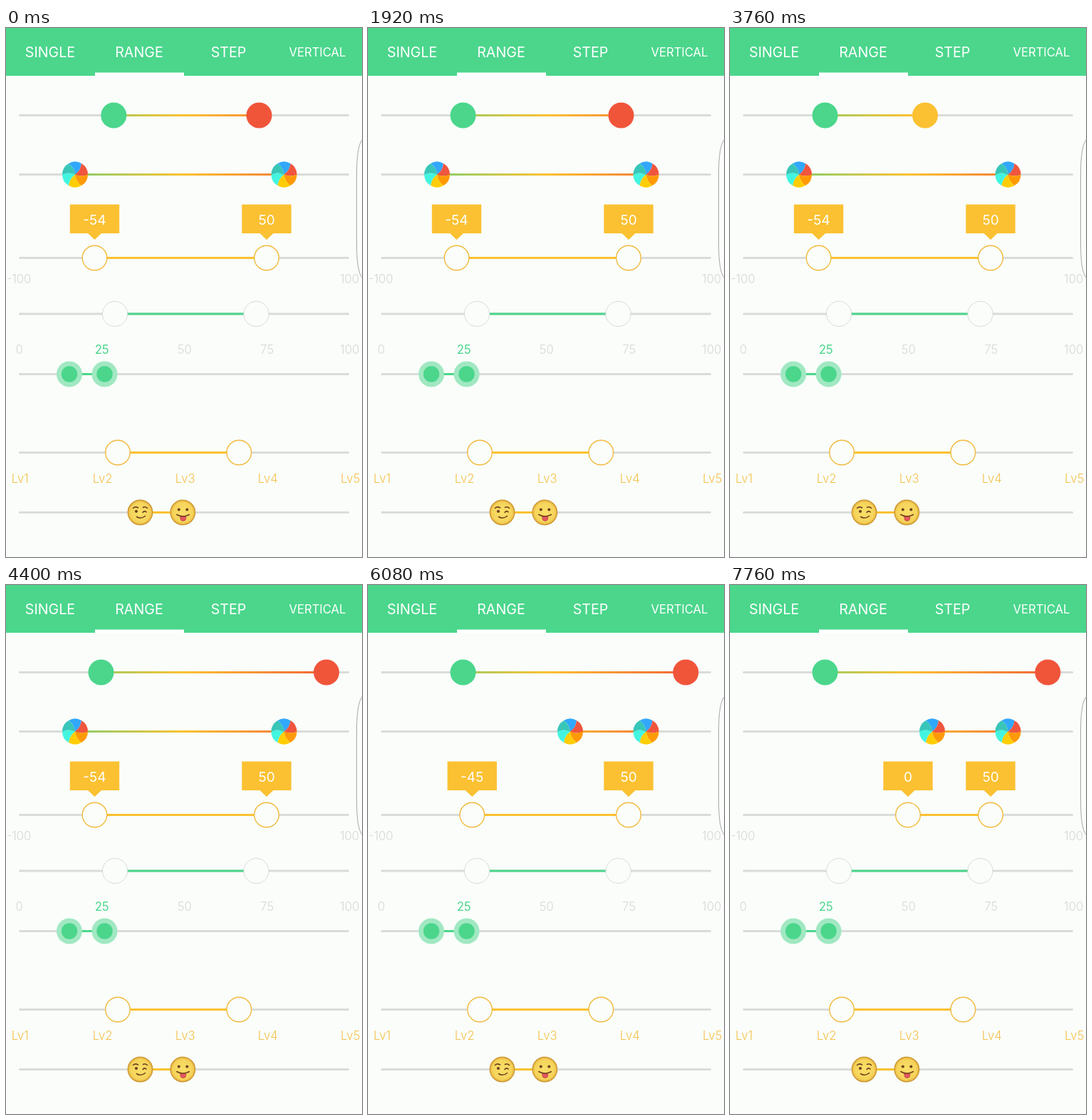
An HTML page that plays this animation: 500x742 px, repeating every 8 s.

```html
<!DOCTYPE html>
<html lang="en">
<head>
<meta charset="utf-8">
<title>Range sliders</title>
<style>
  html, body { margin: 0; width: 100%; height: 100%; overflow: hidden; background: #fafdfa; }
  svg { display: block; width: 100vw; height: 100vh; }
  text { font-family: Inter, Roboto, sans-serif; font-weight: 300; text-anchor: middle; }
  .tab { font-weight: 400; fill: #fff; font-size: 19.7px; }
  .mark { font-size: 16.7px; fill: #d5d8d5; }
  .tip { font-size: 19px; fill: #fff; font-weight: 400; }
</style>
</head>
<body>
<svg id="stage" viewBox="0 0 500 742">
  <defs>
    <linearGradient id="heat" gradientUnits="userSpaceOnUse" x1="18" y1="0" x2="482" y2="0">
      <stop stop-color="#4bd68c"/>
      <stop offset=".5" stop-color="#fbc132"/>
      <stop offset="1" stop-color="#f0553a"/>
    </linearGradient>
    <radialGradient id="skin">
      <stop stop-color="#f8df68"/>
      <stop offset=".8" stop-color="#f5d45b"/>
      <stop offset="1" stop-color="#e5ad3b"/>
    </radialGradient>
  </defs>
  <rect width="500" height="742" fill="#fafdfa"/>
  <rect width="500" height="67" fill="#4bd68c"/>
  <rect x="125" y="62.5" width="125" height="4.5" fill="#fff"/>
  <path d="M500 157Q492.5 167 492.5 205V302Q492.5 341 500 350" fill="none" stroke="#a6a8a6"/>
</svg>
<script>
const GREEN = '#4bd68c', YELLOW = '#fbc132', RED = '#f0553a', GREY = '#dadcda', PAPER = '#fafdfa';
const LOOP = 8000, STEP = 80, LEFT = 18, SPAN = 464;
const stage = document.getElementById('stage');

function add(parent, tag, attrs, text) {
  const node = document.createElementNS('http://www.w3.org/2000/svg', tag);
  for (const key in attrs) node.setAttribute(key, attrs[key]);
  if (text !== undefined) node.textContent = text;
  parent.append(node);
  return node;
}
const circle = (parent, r, attrs) => add(parent, 'circle', { r, ...attrs });
const path = (parent, d, attrs) => add(parent, 'path', { d, ...attrs });
const label = (x, y, text, cls, attrs) => add(stage, 'text', { x, y, class: cls, ...attrs }, text);

// Thumb drawings, centred on the origin
const disc = g => circle(g, 18, { fill: GREEN });
const ring = color => g => circle(g, 17.3, { fill: PAPER, stroke: color, 'stroke-width': 1.4 });
const ghost = g => circle(g, 17.6, { fill: PAPER, stroke: '#d4d7d4', 'stroke-width': .9 });

function halo(g) {
  circle(g, 18, { fill: '#a1e8c2' });
  circle(g, 11.2, { fill: GREEN });
}

function ball(g) {
  const point = (r, deg) => {
    const a = deg * Math.PI / 180;
    return `${(r * Math.cos(a)).toFixed(2)} ${(r * Math.sin(a)).toFixed(2)}`;
  };
  ['#32a8fc', '#f0553e', '#ff9a05', '#ffcd05', '#43f5e0', '#38c6b9'].forEach((fill, i) => {
    const a = -120 + i * 60, b = a + 60;
    path(g, `M0 0Q${point(10, a + 24)} ${point(18, a)}A18 18 0 0 1 ${point(18, b)}Q${point(10, b + 24)} 0 0`, { fill });
  });
}

function face(g) {
  circle(g, 17.3, { fill: 'url(#skin)', stroke: '#c9952f', 'stroke-width': 1.2 });
}
const brown = { fill: 'none', stroke: '#70401e', 'stroke-width': 1.6, 'stroke-linecap': 'round' };

function wink(g) {
  face(g);
  circle(g, 2.1, { cx: -5.5, cy: -1.5, fill: '#70401e' });
  path(g, 'M-10-6Q-7-9-3-6.5M4-7Q7-9 10-6M3.5 0Q6-3 8.5-.5M-5 6Q1 10 7 5', brown);
}

function tongue(g) {
  face(g);
  circle(g, 2, { cx: -5.5, cy: -4, fill: '#70401e' });
  circle(g, 2, { cx: 6, cy: -4, fill: '#70401e' });
  path(g, 'M-3.5 5.5H4.5V8A4 4 0 0 1-3.5 8Z', { fill: '#e4575e', stroke: '#b6453e', 'stroke-width': .7 });
  path(g, 'M-8.5 3Q0 8 9 3', brown);
}

function slider(y, color, drawLow, drawHigh = drawLow) {
  add(stage, 'rect', { x: LEFT, y: y - 1.5, width: SPAN, height: 3, rx: 1.5, fill: GREY });
  const bar = add(stage, 'rect', { y: y - 1.5, height: 3, fill: color });
  const thumbs = [drawLow, drawHigh].map(draw => {
    const g = add(stage, 'g');
    draw(g);
    return g;
  });
  return {
    thumbs,
    set(low, high) {
      bar.setAttribute('x', low);
      bar.setAttribute('width', Math.max(0, high - low));
      thumbs.forEach((g, i) => g.setAttribute('transform', `translate(${i ? high : low} ${y})`));
    }
  };
}

function addTip(thumb) {
  path(thumb, 'M-34.7-75H34.7V-34.5H9.5L0-25.5L-9.5-34.5H-34.7Z', { fill: YELLOW });
  return add(thumb, 'text', { y: -46.5, class: 'tip' });
}

label(62, 40.5, 'SINGLE', 'tab');
label(187, 40.5, 'RANGE', 'tab');
label(312.5, 40.5, 'STEP', 'tab');
label(437.5, 39.5, 'VERTICAL', 'tab', { style: 'font-size:16.6px' });

const heat = slider(122.5, 'url(#heat)', disc);
const balls = slider(205.5, 'url(#heat)', ball);
const tipped = slider(322.5, YELLOW, ring('#f2b93c'));
const tips = tipped.thumbs.map(addTip);
slider(401, GREEN, ghost).set(153, 351.5);
slider(485.5, GREEN, halo).set(89, 138.5);
slider(595.5, YELLOW, ring('#f2b93c')).set(157, 327.3);
slider(679.5, YELLOW, wink, tongue).set(188.5, 248.3);

label(18, 358, '-100', 'mark');
label(482.5, 358, '100', 'mark');
for (let i = 0; i < 5; i++) {
  const x = LEFT + i * SPAN / 4 + .7;
  label(x, 457, i * 25, 'mark', i === 1 ? { style: `fill:${GREEN};font-weight:400` } : {});
  label(x + 1, 638, 'Lv' + (i + 1), 'mark', { style: 'fill:#f5c04a' });
}

// [time, x] pairs for each dragged thumb
const drag = {
  heatLow: [[400, 151.3], [560, 189], [640, 189], [1040, 296], [1520, 155], [1920, 133.5]],
  heatHigh: [[2240, 355.5], [2960, 166.3], [3120, 157], [3200, 160], [3600, 300], [3760, 274],
    [4000, 239], [4320, 436], [4400, 450], [4480, 446.3]],
  ballLow: [[4720, 97], [4880, 150], [5040, 215], [5200, 258], [5440, 284]],
  tipLow: [[6000, 124.5], [6160, 168], [6400, 229], [6640, 250]],
  tipHigh: [[7360, 366], [7520, 376], [7600, 376], [7760, 366]]
};

function at(keys, t) {
  const i = keys.findIndex(k => k[0] > t);
  if (i === 0) return keys[0][1];
  if (i < 0) return keys[keys.length - 1][1];
  const [t0, x0] = keys[i - 1], [t1, x1] = keys[i];
  return x0 + (x1 - x0) * (t - t0) / (t1 - t0);
}

const share = x => (x - LEFT) / SPAN;
const zoneColor = x => share(x) < .33 ? GREEN : share(x) < .66 ? YELLOW : RED;

function render(t) {
  const heatX = [at(drag.heatLow, t), at(drag.heatHigh, t)];
  heat.set(...heatX);
  heat.thumbs.forEach((g, i) => g.firstChild.setAttribute('fill', zoneColor(heatX[i])));
  balls.set(at(drag.ballLow, t), 390.5);
  const tipX = [at(drag.tipLow, t), at(drag.tipHigh, t)];
  tipped.set(...tipX);
  tips.forEach((tip, i) => tip.textContent = String(Math.round(share(tipX[i]) * 200 - 100)));
}

const start = performance.now();
function tick() {
  const t = (performance.now() - start) % LOOP;
  render(Math.floor(t / STEP) * STEP);
  requestAnimationFrame(tick);
}
tick();
</script>
</body>
</html>
```
